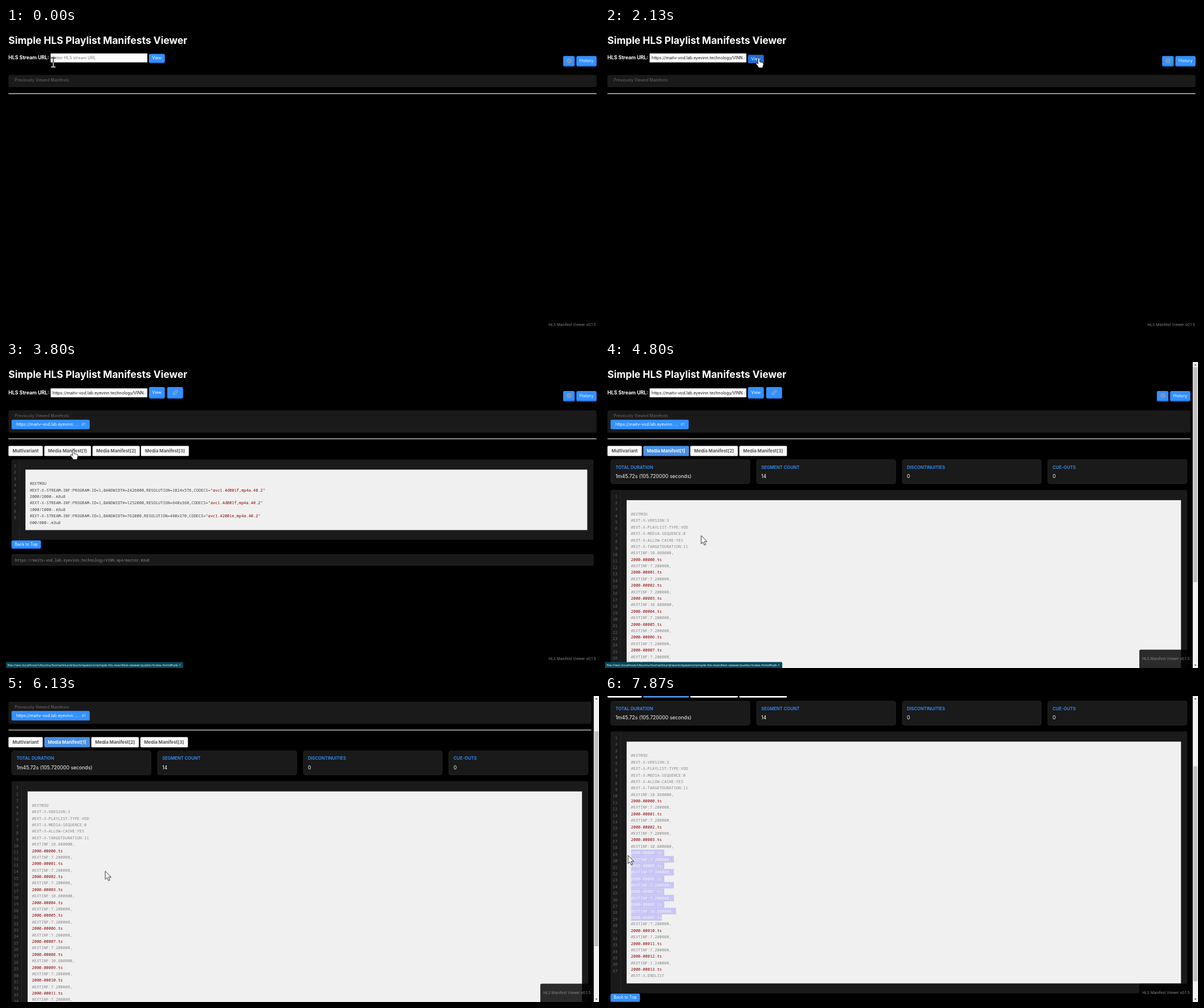
These frames come from a looping animation (1041x538 px, 8000 ms). An HTML page:

```html
<!DOCTYPE html>
<html lang="en">
<head>
<meta charset="utf-8">
<title>HLS Manifest Viewer</title>
<style>
@property --y { syntax: '<number>'; inherits: true; initial-value: 0; }

html, body { margin: 0; width: 100%; height: 100%; overflow: hidden; background: #000; }
body {
  --focus: 0; --text: 0; --press: 0; --chip: 0; --open: 0; --media: 0; --status: 0;
  --beam: 1; --arrow: 0; --hand: 0;
  position: relative;
  font: 13.33px Inter, sans-serif;
  color: #fff;
  animation: phase 8s step-end infinite, scroll 8s linear infinite;
}

/* The page is laid out 1920 wide and scaled to the stage. */
#stage {
  position: absolute; left: 0; top: 0; width: 1920px; height: 993px;
  overflow: hidden; background: #000;
  transform: scale(.5421875); transform-origin: 0 0;
  --bar: calc(var(--media) * 17px);
  --drop: calc(var(--open) * 4.6px);
  --grow: calc(var(--chip) * 32px);
}
#stage div, #stage h1 { position: absolute; box-sizing: border-box; white-space: pre; margin: 0; }
#page { left: 0; top: 0; width: 1920px; height: 1370px; transform: translateY(calc(var(--y) * -1px)); }

h1 { left: 8px; top: 21.4px; font-size: 32px; line-height: 39px; font-weight: 700; }
#label { left: 8px; top: 86px; font-size: 16px; line-height: 20px; font-weight: 700; }
#field {
  left: 144px; top: 81.5px; width: 314px; height: 30.5px; padding: 0 6px;
  background: #fff; border: 1px solid #767676; border-radius: 2px;
  box-shadow: inset 0 0 0 calc(var(--focus) * 2px) #101010;
}
#label, #field { transform: translateY(calc(var(--open) * 3px)); }
#field div { left: 6px; right: 6px; line-height: 28px; overflow: hidden; }
#hint { color: #757575; opacity: calc(1 - var(--text)); }
#url { color: #111; opacity: var(--text); }

#stage .btn {
  display: flex; align-items: center; justify-content: center;
  background: #3391ff; border-radius: 4px; box-shadow: 0 3px 0 #1c6fd8;
}
#view { left: 463px; width: 51px; top: calc(84px - var(--open) * 3px); height: calc(26.5px + var(--open) * 8.5px); }
#pressed { left: 463px; width: 51px; top: 87px; height: 26px; opacity: var(--press); }
#stage #pressed { background: #1f6fd8; box-shadow: 0 -4px 0 #000; }
#link { left: 522px; width: 51px; top: 81px; height: 35px; opacity: var(--open); }
#gear, #history { top: calc(90.5px + var(--open) * 3px); height: 31px; }
#gear { right: calc(79px + var(--bar)); width: 37px; }
#history { right: calc(8px + var(--bar)); width: 65px; }

#past {
  left: 8px; right: calc(8px + var(--bar)); top: calc(152px + var(--drop));
  height: calc(40px + var(--grow)); background: #1a1a1a; border-radius: 5px;
}
#past .cap { left: 20px; top: 9px; font-size: 13px; line-height: 16px; color: #6a6a6a; }
#chip {
  left: 10px; top: 30.5px; width: 253px; height: 31px; line-height: 31px; padding-left: 15px;
  background: #3391ff; border-radius: 4px; opacity: var(--chip);
}
#chip div { left: 227px; top: 0; font-size: 12px; opacity: .7; }
#rule {
  left: 8px; right: calc(8px + var(--bar)); top: calc(211.5px + var(--drop) + var(--grow));
  height: 2px; background: #fff;
}

.body { left: 0; top: 0; width: 1920px; height: 1370px; }
#multi { opacity: calc(var(--open) - var(--media)); }
#media { opacity: var(--media); }
.tab {
  top: 271.5px; height: 33.5px; line-height: 34px; text-align: center;
  background: #fafafa; color: #555; border-radius: 3px; font-size: 14.4px; font-weight: 700;
}
.tab.on { background: #4a90e2; color: #fff; font-weight: 600; }
.card {
  top: 315.5px; width: 451.75px; height: 79px;
  background: #1a1a1a; border: 1px solid #333; border-radius: 8px;
}
.card div { left: 15px; top: 15px; line-height: 18px; font-size: 14px; font-weight: 600; color: #3391ff; }
.card .val { top: 43px; line-height: 20px; font-size: 16px; font-weight: 400; color: #fff; }
.panel { left: 18px; background: #1a1a1a; border-radius: 5px; }
.nums {
  left: 0; top: 0; bottom: 0; padding-top: 10px; text-align: right; color: #666;
  border-right: 1px solid #333;
}
.nums, .code, .path { font: 12.83px/21px 'Noto Sans Mono', 'DejaVu Sans Mono', monospace; }
.code { padding: 35px 14px 0; background: #f0f0f0; color: #444; }
.code i { font-style: normal; color: #888; }
.code b { font-weight: 400; color: #800; }
.path {
  left: 18px; top: 624px; width: 1884px; height: 36px; padding-left: 10px;
  font-size: 11.92px; line-height: 34px; color: #888;
  background: #1a1a1a; border: 1px solid #333; border-radius: 3px;
}
#picked { left: 14px; top: 350px; animation: pick 8s step-end infinite; }
#picked span { display: block; width: max-content; background: #c8c4f6; color: #f4f4f4; }

#foot {
  right: var(--bar); bottom: 0; width: 173px; height: 60px; padding-right: 10px;
  text-align: right; font-size: 12px; line-height: 60px; color: #888;
  background: rgba(0, 0, 0, .82); border-top-left-radius: 5px;
}
#status {
  left: 0; bottom: 0; width: 574px; height: 20.5px; padding-left: 5px;
  font: 11.35px/20px 'Open Sans', 'Noto Sans', sans-serif;
  background: #06485a; border-top-right-radius: 3px; opacity: var(--status);
}
#scrollbar { right: 0; top: 0; width: 17px; height: 993px; background: #f1f1f1; opacity: var(--media); }
#thumb {
  left: 2px; top: 17px; width: 13px; height: 697px; background: #c1c1c1;
  transform: translateY(calc(var(--y) * .703px));
}
#scrollbar svg { position: absolute; left: 0; top: 0; }

.cursor { position: absolute; left: 0; top: 0; overflow: visible; animation: move 8s ease-in-out infinite; }
#beam { opacity: var(--beam); mix-blend-mode: difference; }
#arrow { opacity: var(--arrow); }
#hand { opacity: var(--hand); }

@keyframes phase {
  0% { --focus: 0; --text: 0; --press: 0; --chip: 0; --open: 0; --media: 0; --status: 0; --beam: 1; --arrow: 0; --hand: 0; }
  2.45% { --focus: 1; }
  15% { --beam: 0; --arrow: 1; }
  16.25% { --text: 1; }
  25% { --arrow: 0; --hand: 1; }
  25.8% { --press: 1; --focus: 0; }
  27.5% { --press: 0; }
  29.1% { --chip: 1; }
  30.8% { --open: 1; }
  31.6% { --hand: 0; --arrow: 1; }
  42.5% { --arrow: 0; --hand: 1; }
  43.3% { --status: 1; }
  53.3% { --media: 1; }
  54.4% { --hand: 0; --arrow: 1; }
  64.1% { --status: 0; }
  86.3% { --arrow: 0; --beam: 1; }
  95% { --beam: 0; --arrow: 1; }
}
@keyframes scroll {
  0%, 72.5% { --y: 0; }
  73.35% { --y: 9; }
  75% { --y: 60; }
  77.5% { --y: 180; }
  80% { --y: 283; }
  83.3%, 100% { --y: 300; }
}
@keyframes pick {
  0% { clip-path: inset(100% 0 0 0); }
  87.5% { clip-path: inset(100% 0 0 0); animation-timing-function: steps(9); }
  94.1% { clip-path: inset(18.18% 0 0 0); }
  95.8% { clip-path: inset(9.09% 0 0 0); }
  97.4%, 100% { clip-path: inset(0 0 0 0); }
}
@keyframes move {
  0%, .8% { transform: translate(83px, 60.5px); }
  3.35%, 5.8% { transform: translate(96.5px, 56.5px); }
  6.6%, 12.5% { transform: translate(97px, 56.5px); }
  20%, 22.5% { transform: translate(150px, 92px); }
  25.8%, 31% { transform: translate(270px, 52.5px); }
  39%, 41.6% { transform: translate(156.5px, 147px); }
  47.5%, 53.8% { transform: translate(118px, 154px); }
  59.4%, 66.6% { transform: translate(168.5px, 305px); }
  67.5% { transform: translate(170px, 306px); }
  68.4%, 73.4% { transform: translate(168px, 305.5px); }
  80% { transform: translate(180px, 310px); }
  83.4% { transform: translate(163px, 386px); }
  86.9%, 87.5% { transform: translate(101px, 389px); animation-timing-function: linear; }
  94.1%, 95% { transform: translate(46px, 299px); }
  98.3%, 100% { transform: translate(40px, 280px); }
}
</style>
</head>
<body>
<div id="stage">
  <div id="page">
    <h1>Simple HLS Playlist Manifests Viewer</h1>
    <div id="label">HLS Stream URL:</div>
    <div id="field"><div id="hint">Enter HLS stream URL</div><div id="url"></div></div>
    <div id="view" class="btn">View</div>
    <div id="pressed" class="btn">View</div>
    <div id="link" class="btn"><svg width="18" height="18" viewBox="-9 -9 18 18" fill="none" stroke="#9fb3c8" stroke-width="2"><g transform="rotate(-45)"><rect x="-8.5" y="-2.8" width="9" height="5.6" rx="2.8"/><rect x="-.5" y="-2.8" width="9" height="5.6" rx="2.8"/><path d="M-3 0H3" stroke="#66788a"/></g></svg></div>
    <div id="gear" class="btn"><svg width="18" height="18" viewBox="-9 -9 18 18" fill="none" stroke="#a39c9f"><circle r="7.2" stroke-width="2.4" stroke-dasharray="2.8 2.85"/><circle r="5.3" stroke-width="2.4"/><circle r="1.8" stroke-width="1.4"/></svg></div>
    <div id="history" class="btn">History</div>
    <div id="past">
      <div class="cap">Previously Viewed Manifests</div>
      <div id="chip">https://maitv-vod.lab.eyevinn. ...<div>#1</div></div>
    </div>
    <div id="rule"></div>
    <div id="multi" class="body"></div>
    <div id="media" class="body"></div>
  </div>
  <div id="foot">HLS Manifest Viewer v0.1.5</div>
  <div id="scrollbar">
    <div id="thumb"></div>
    <svg width="17" height="993" fill="#505050"><path d="M4.5 11 8.5 6.5 12.5 11ZM4.5 981 8.5 985.5 12.5 981Z"/></svg>
  </div>
  <div id="status">file://wsl.localhost/Ubuntu/home/klund/work/eyevinn/simple-hls-manifest-viewer/public/index.html#tab-1</div>
</div>

<svg id="beam" class="cursor" width="1" height="1" fill="none" stroke="#fff" stroke-width="1.3"><path d="M-4 -8H4M0 -8V8M-4 8H4"/></svg>
<svg id="arrow" class="cursor" width="1" height="1"><path d="M.4 .2V14.6L3.6 11.6 6 17 8.3 16 6 10.8H10.8Z" fill="#fff" stroke="#000" stroke-width=".8"/></svg>
<svg id="hand" class="cursor" width="1" height="1"><path transform="translate(-5.5 0)" d="M4 1.5a1.5 1.5 0 0 1 3 0V7l5 1.2q2 .6 1.8 2.6l-.8 4.2-1.2 2.5H5.5L4 15 .8 11q-.8-1.4.6-2 1-.3 1.8.8l.8 1Z" fill="#fff" stroke="#000" stroke-width=".8"/></svg>

<script>
const el = id => document.getElementById(id);
const address = 'https://maitv-vod.lab.eyevinn.technology/VINN.mp4/master.m3u8';
el('url').textContent = address;

const box = (cls, css, inner) => `<div class="${cls}" style="${css}">${inner}</div>`;
const names = ['Multivariant', 'Media Manifest[1]', 'Media Manifest[2]', 'Media Manifest[3]'];

// spans: [left, width] per tab
const tabs = (spans, active) => spans.map(([x, w], i) =>
  box(i === active ? 'tab on' : 'tab', `left:${x}px;width:${w}px`, names[i])).join('');

function panel(o) {
  const nums = Array.from({ length: o.count }, (_, i) => i + 1).join('\n');
  const height = 48.5 + o.lines.length * 21;
  return box('panel', `top:${o.top}px;width:${o.width}px;height:${height + 65}px`,
    box('nums', `width:${o.gutter}px;padding-right:${o.gutter - o.numEnd}px`, nums) +
    box('code', `left:${o.left}px;right:20px;top:33px;height:${height}px`, o.lines.join('\n') + (o.extra || ''))) +
    box('btn', `left:18px;top:${o.top + height + 66}px;width:95px;height:25px`, 'Back to Top');
}

const variant = (rate, size, codec) =>
  `#EXT-X-STREAM-INF:PROGRAM-ID=1,BANDWIDTH=${rate},RESOLUTION=${size},CODECS=<b>"${codec},mp4a.40.2"</b>`;
const master = [
  '#EXTM3U',
  variant(2426000, '1024x576', 'avc1.4d001f'), '2000/2000-.m3u8',
  variant(1252000, '640x360', 'avc1.4d001f'), '1000/1000-.m3u8',
  variant(762000, '480x270', 'avc1.42001e'), '600/600-.m3u8'
];
el('multi').innerHTML =
  tabs([[8, 111], [123.5, 151], [279.5, 153.5], [437, 155]], -1) +
  panel({ top: 316, width: 1884, count: 9, gutter: 26, numEnd: 16, left: 45, lines: master }) +
  box('path', '', address);

const list = ['#EXTM3U', '#EXT-X-VERSION:3', '#EXT-X-PLAYLIST-TYPE:VOD',
  '#EXT-X-MEDIA-SEQUENCE:0', '#EXT-X-ALLOW-CACHE:YES', '#EXT-X-TARGETDURATION:11'];
for (let i = 0; i < 14; i++) {
  const len = i === 0 ? 10.88 : i === 13 ? 1.24 : i % 5 === 4 ? 10.8 : 7.2;
  list.push(`#EXTINF:${len.toFixed(6)},`, `2000-${String(i).padStart(5, '0')}.ts`);
}
list.push('#EXT-X-ENDLIST');

const paint = s => s[0] === '#' ? `<i>${s}</i>` : `<b>${s}</b>`;
const picked = list.slice(15, 26).map((s, i) => `<span>${s}${i < 10 ? ' ' : ''}</span>`).join('');
const stats = [['TOTAL DURATION', '1m45.72s (105.720000 seconds)'],
  ['SEGMENT COUNT', 14], ['DISCONTINUITIES', 0], ['CUE-OUTS', 0]];

el('media').innerHTML =
  tabs([[8, 111], [123.5, 148], [276, 154], [434.5, 154.5]], 1) +
  stats.map(([name, val], i) => box('card', `left:${18 + i * 471.75}px`,
    box('', '', name) + box('val', '', val))).join('') +
  panel({ top: 415, width: 1867, count: 37, gutter: 32.5, numEnd: 23.5, left: 52,
    lines: list.map(paint), extra: `<div id="picked">${picked}</div>` });
</script>
</body>
</html>
```
